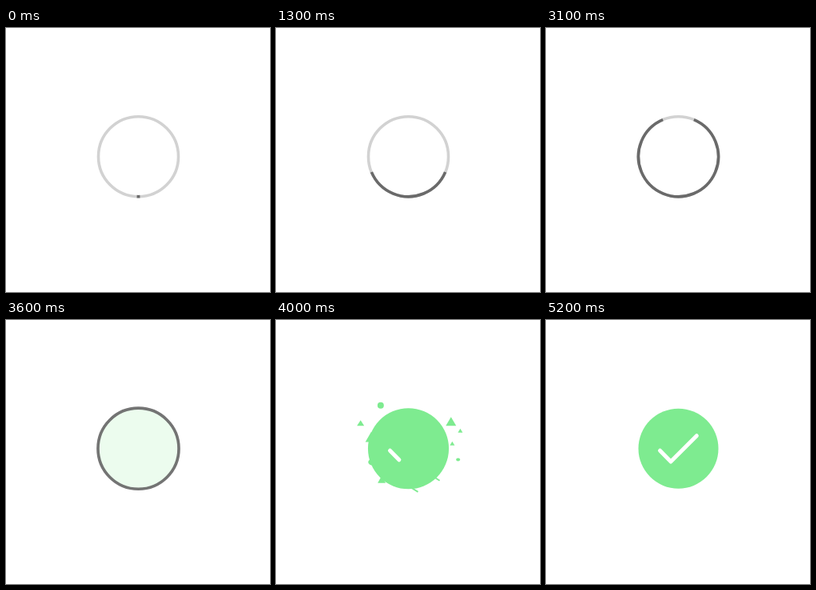
An HTML page with a canvas that plays this animation: 330x330 px, repeating every 5300 ms.

```html
<!DOCTYPE html>
<html lang="en">
<head>
<meta charset="utf-8">
<title>Progress ring to success</title>
<style>
  html, body { margin: 0; width: 100%; height: 100%; overflow: hidden; background: #fff; }
  canvas { display: block; }
</style>
</head>
<body>
<canvas id="stage" width="330" height="330"></canvas>
<script>
const ctx = document.getElementById('stage').getContext('2d');
const LOOP = 5300, STEP = 100;
const CX = 165.5, CY = 160.7, R = 50;
const GREEN = '#7eeb90', TRACK = '#d2d2d2', DARK = '#6a6a6a';
const BURST = 3740, REACH = 660; // burst start, time until the listed places are reached

// kind, x, y, width, height
const confetti = [
  ['dot', 98.5, 60, 8, 8], ['dot', 195.2, 95, 8, 8],
  ['dot', 80, 197, 12, 8], ['dot', 285.5, 191, 5, 4],
  ['tri', 50, 102.5, 9, 7], ['tri', 76, 136, 15, 13],
  ['tri', 268.4, 98.7, 13, 11], ['tri', 290.8, 120.7, 6, 5],
  ['tri', 271.4, 151.5, 6, 5], ['tri', 101, 238.5, 10, 9],
  ['line', 106.4, 175.7, 6, 1.6], ['line', 176.4, 261.2, 9, 1.8],
  ['line', 228.7, 234, 9, 1.8]
];

const ramp = (t, from, to) => Math.min(1, Math.max(0, (t - from) / (to - from)));
const easeOut = p => 1 - (1 - p) ** 3;
const travel = t => easeOut(ramp(t, BURST, BURST + 1600));

function arc(halfAngle, color) {
  ctx.beginPath();
  ctx.arc(0, 0, R, Math.PI / 2 - halfAngle, Math.PI / 2 + halfAngle);
  ctx.lineWidth = 3.6;
  ctx.strokeStyle = color;
  ctx.stroke();
}

function drawPiece([kind, x, y, w, h], t) {
  const reach = travel(t) / travel(BURST + REACH);
  const fall = 5 * ((t - BURST) / REACH) ** 2;
  ctx.save();
  ctx.translate((x - CX) * reach, (y - CY - 5) * reach + fall);
  ctx.beginPath();
  if (kind === 'dot') {
    ctx.ellipse(0, 0, w / 2, h / 2, 0, 0, Math.PI * 2);
  } else if (kind === 'tri') {
    ctx.moveTo(0, -h / 2);
    ctx.lineTo(w / 2, h / 2);
    ctx.lineTo(-w / 2, h / 2);
  } else {
    const turn = ramp(t, 3800, 4400);
    const length = w * (2 - turn);
    ctx.rotate((18 + 42 * turn) * Math.PI / 180);
    ctx.rect(-length / 2, -h / 2, length, h);
  }
  ctx.fill();
  ctx.restore();
}

function drawConfetti(t) {
  if (t <= BURST) return;
  ctx.fillStyle = GREEN;
  ctx.globalAlpha = ramp(t, 3700, 3900) * (1 - ramp(t, 4800, 5200));
  confetti.forEach(piece => drawPiece(piece, t));
}

function drawBadge(t) {
  const pop = 1 + 0.11 * Math.sin(Math.PI * ramp(t, 3550, 4050)) ** 2;
  ctx.save();
  ctx.scale(pop, pop);

  ctx.globalAlpha = ramp(t, 3550, 3883);
  ctx.fillStyle = GREEN;
  ctx.beginPath();
  ctx.arc(0, 0, R, 0, Math.PI * 2);
  ctx.fill();

  ctx.globalAlpha = 1 - ramp(t, 3570, 3990);
  if (t < 3600) arc(Math.PI, TRACK);
  arc(Math.min(180, 2.2 + t / 20) * Math.PI / 180, DARK);
  ctx.restore();
}

function drawCheck(t) {
  const drawn = 65 * ramp(t, 3900, 4300);
  if (!drawn) return;
  ctx.globalAlpha = 1;
  ctx.strokeStyle = '#fff';
  ctx.lineWidth = 5;
  ctx.lineCap = ctx.lineJoin = 'round';
  ctx.setLineDash([drawn, 100]);
  ctx.beginPath();
  ctx.moveTo(142.5 - CX, 163.2 - CY);
  ctx.lineTo(156 - CX, 177 - CY);
  ctx.lineTo(188.5 - CX, 144.5 - CY);
  ctx.stroke();
}

function draw(now) {
  const t = Math.floor((now % LOOP) / STEP) * STEP;
  ctx.clearRect(0, 0, 330, 330);
  ctx.save();
  ctx.translate(CX, CY);
  drawConfetti(t);
  drawBadge(t);
  drawCheck(t);
  ctx.restore();
}

let start;
function tick(now) {
  start ??= now;
  draw(now - start);
  requestAnimationFrame(tick);
}
requestAnimationFrame(tick);
</script>
</body>
</html>
```
